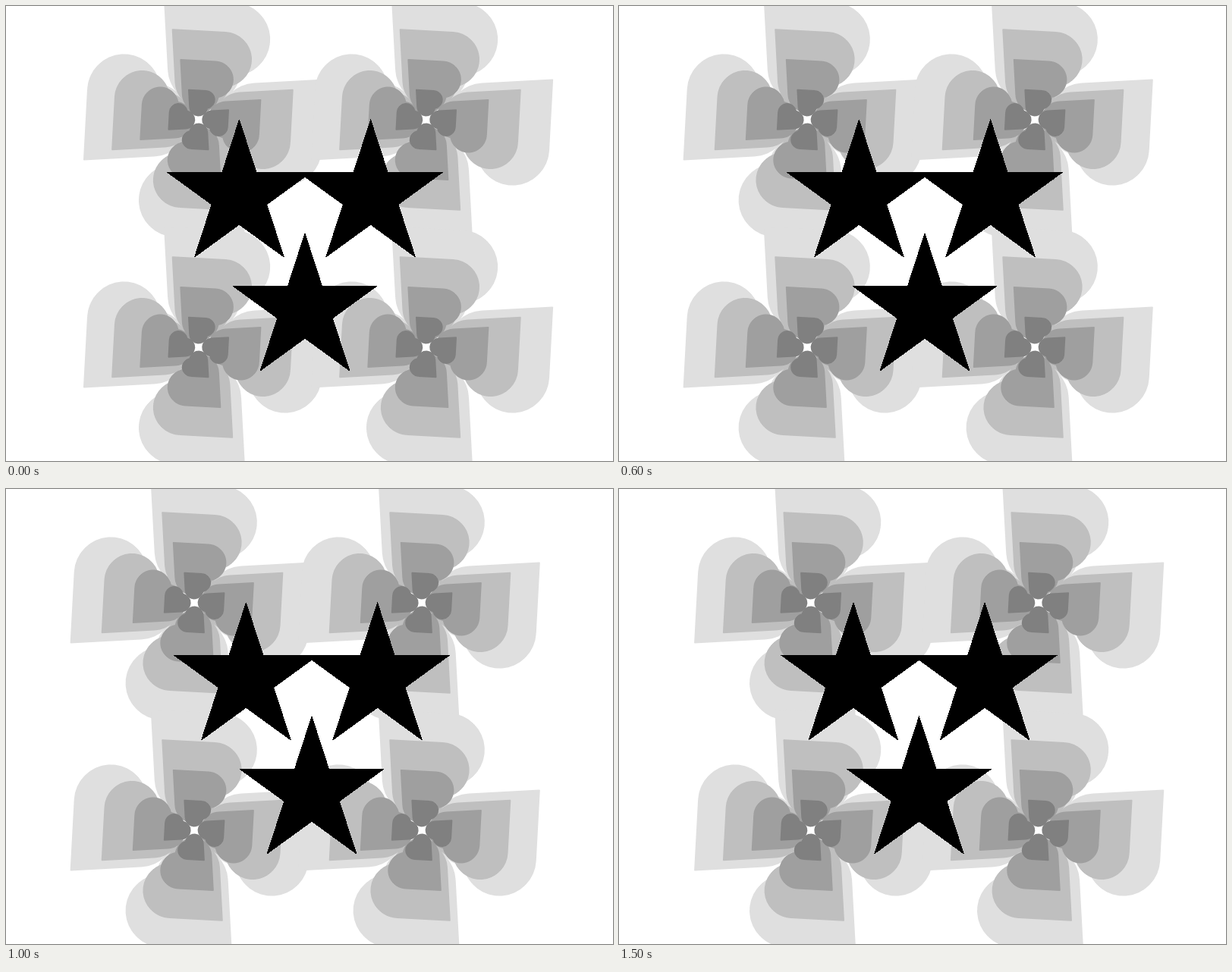
Write an HTML page that moves like this. It is 800 px wide and 600 px high and loops after 1600 ms.

```html
<!DOCTYPE html>
<html lang="en">
<head>
<meta charset="utf-8">
<title>Stars over pinwheels</title>
<style>
html, body { margin: 0; width: 100%; height: 100%; overflow: hidden; background: #fff; }
svg { display: block; width: 100vw; height: 100vh; }
path, polygon { stroke-width: 1; stroke-linejoin: round; vector-effect: non-scaling-stroke; }
</style>
</head>
<body>
<svg id="stage" viewBox="0 0 800 600" shape-rendering="crispEdges"></svg>
<script>
const stage = document.getElementById('stage');
const LOOP = 1600, STEP = 100;
const HUBS = [[250, 150], [550, 150], [250, 450], [550, 450]];
const GREYS = ['#808080', '#9f9f9f', '#bfbfbf', '#dfdfdf'];

function add(parent, tag, attrs) {
  const el = document.createElementNS('http://www.w3.org/2000/svg', tag);
  for (const key in attrs) el.setAttribute(key, attrs[key]);
  parent.appendChild(el);
  return el;
}

// Heart in a square box with one corner at the origin, tip upwards:
// two circles of radius r with tangents to the tip
function heartPath(side, r) {
  const mid = side / 2, dx = mid - r, dy = side - r;
  const dist = Math.hypot(dx, dy);
  const half = Math.atan2(dx, dy) + Math.asin(r / dist);
  const edge = Math.sqrt(dist * dist - r * r);
  const x = edge * Math.sin(half), y = edge * Math.cos(half) - side;
  const notch = Math.sqrt(r * r - dx * dx) - r;
  const arc = `A${r} ${r} 0 0 1 `;
  return `M${mid} ${-side}L${mid + x} ${y}${arc}${mid} ${notch}${arc}${mid - x} ${y}Z`;
}

function starPoints(cx, cy, radius) {
  const inner = radius * (3 - Math.sqrt(5)) / 2;
  return Array.from({ length: 10 }, (_, i) => {
    const r = i % 2 ? inner : radius;
    const a = i * Math.PI / 5;
    return (cx + r * Math.sin(a)).toFixed(2) + ',' + (cy - r * Math.cos(a)).toFixed(2);
  }).join(' ');
}

const heart = heartPath(150, 48);
const layers = [];

// Back to front: the largest, palest pinwheels sway the most
for (let size = 4; size >= 1; size--) {
  const grey = GREYS[size - 1];
  const el = add(stage, 'g', { fill: grey, stroke: grey });
  for (const [x, y] of HUBS) {
    for (let turn = 45; turn < 360; turn += 90) {
      add(el, 'path', {
        d: heart,
        transform: `translate(${x} ${y}) rotate(${turn}) scale(${size / 4})`
      });
    }
  }
  layers.push({ el, reach: 1.15 + 2.6 * size });
}

const stars = add(stage, 'g', { fill: '#000', stroke: '#000' });
for (let i = 0; i < 3; i++) {
  const a = Math.PI / 2 + i * 2 * Math.PI / 3;
  add(stars, 'polygon', {
    points: starPoints(400 + 100 * Math.cos(a), 300 + 100 * Math.sin(a), 100)
  });
}
layers.push({ el: stars, reach: -6 });

function draw(ms) {
  const t = Math.floor((ms % LOOP) / STEP) * STEP / LOOP;
  const sway = Math.abs(4 * t - 2) - 1; // 1 to -1 and back, linear
  for (const { el, reach } of layers) {
    el.setAttribute('transform', `translate(${(reach * sway).toFixed(3)} 0)`);
  }
}

let start;
function tick(now) {
  if (start === undefined) start = now;
  draw(now - start);
  requestAnimationFrame(tick);
}
draw(0);
requestAnimationFrame(tick);
</script>
</body>
</html>
```
